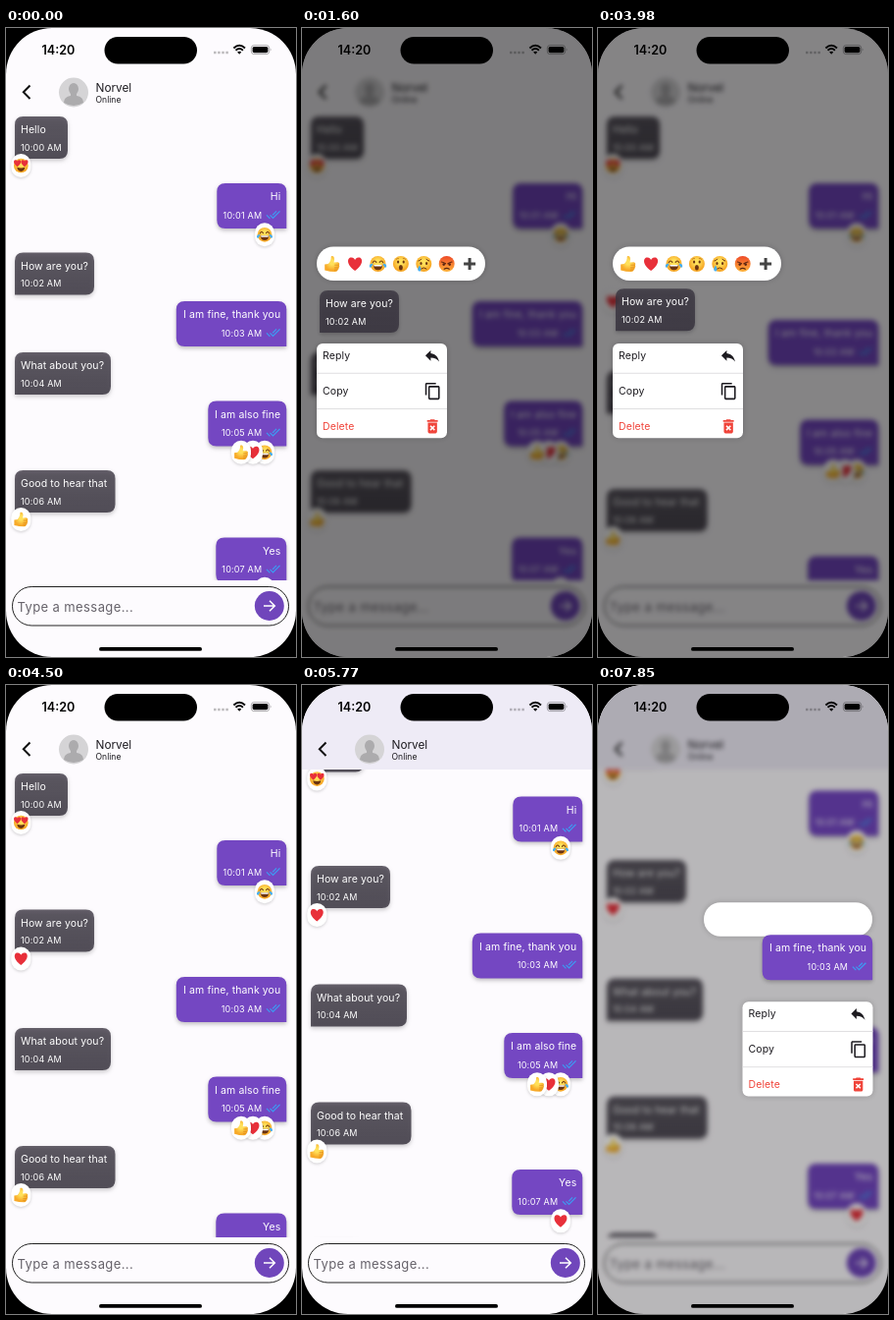
Animation, 296 px wide and 640 px high, one loop 8000 ms. Source, as an HTML page:

```html
<!DOCTYPE html>
<html lang="en">
<head>
<meta charset="utf-8">
<title>Chat reactions</title>
<style>
  html, body { margin: 0; width: 100%; height: 100%; overflow: hidden; background: #000; }
  svg { display: block; width: 296px; height: 640px; border-radius: 47px; font-family: Inter, sans-serif; }
  .body { font-size: 10.5px; letter-spacing: .1px; }
  .time { font-size: 9px; letter-spacing: .2px; }
  .end { text-anchor: end; }
  .bubble { fill: #fff; filter: drop-shadow(0 2px 2px rgba(0, 0, 0, .25)); }
  .pill { filter: drop-shadow(0 1px 1.5px rgba(0, 0, 0, .18)); }
  .card { filter: drop-shadow(0 0 3px rgba(0, 0, 0, .2)); }
</style>
</head>
<body>
<svg viewBox="0 0 296 640">
  <defs>
    <radialGradient id="yellow" cy=".4"><stop offset=".3" stop-color="#ffe05a"/><stop offset="1" stop-color="#f7a928"/></radialGradient>
    <linearGradient id="rage" x2="0" y2="1"><stop stop-color="#ee4a28"/><stop offset="1" stop-color="#ffb33a"/></linearGradient>
    <linearGradient id="slate" x2="0" y2="1"><stop stop-color="#35303c" stop-opacity=".76"/><stop offset="1" stop-color="#35303c" stop-opacity=".82"/></linearGradient>
    <clipPath id="viewport"><rect y="86" width="296" height="476"/></clipPath>

    <path id="heart" fill="#e8303a" d="M0 7C-10 0-7.5-7-3.7-6.5-1.5-6.4 0-4.5 0-4 0-4.5 1.5-6.4 3.7-6.5 7.5-7 10 0 0 7Z"/>
    <circle id="face" r="8" fill="url(#yellow)"/>
    <g id="love">
      <use href="#face"/>
      <use href="#heart" transform="translate(-4 -2.6) scale(.55)"/><use href="#heart" transform="translate(4 -2.6) scale(.55)"/>
      <path fill="#6b3410" d="M-4.3 2Q0 3.4 4.3 2 3.8 6.4 0 6.4-3.8 6.4-4.3 2Z"/>
    </g>
    <g id="joy">
      <use href="#face"/>
      <path fill="none" stroke="#6b3410" stroke-width="1.1" stroke-linecap="round" d="M-5.2-1.4Q-3.5-4.4-1.6-1.6M5.2-1.4Q3.5-4.4 1.6-1.6"/>
      <path fill="#6b3410" d="M-4.8 1H4.8Q4.3 6.3 0 6.3-4.3 6.3-4.8 1Z"/><path fill="#fff" d="M-4.3 1H4.3L3.9 2.6H-3.9Z"/>
      <path fill="#45aef0" d="M-5-.4Q-9.5 0-8.6 3.2-6.5 5-5-.4ZM5-.4Q9.5 0 8.6 3.2 6.5 5 5-.4Z"/>
    </g>
    <g id="wow">
      <use href="#face"/>
      <g fill="#6b3410"><ellipse cx="-2.8" cy="-2" rx="1.1" ry="1.6"/><ellipse cx="2.8" cy="-2" rx="1.1" ry="1.6"/><ellipse cy="3.7" rx="2" ry="2.7"/></g>
      <path fill="none" stroke="#b5701c" stroke-width=".8" d="M-5-4.5Q-3.5-6-2-5.4M5-4.5Q3.5-6 2-5.4"/>
    </g>
    <g id="sad">
      <use href="#face"/>
      <g fill="#6b3410"><ellipse cx="-2.8" cy="-.5" rx="1.1" ry="1.5"/><ellipse cx="2.8" cy="-.5" rx="1.1" ry="1.5"/></g>
      <path fill="none" stroke="#6b3410" stroke-width="1" stroke-linecap="round" d="M-2.7 5Q0 2.6 2.7 5M-5.4-3Q-3.5-3.4-2.6-4.8M5.4-3Q3.5-3.4 2.6-4.8"/>
      <path fill="#45aef0" d="M-4.2 1.4Q-7 5-5.6 7-3.6 8.4-2.8 6-2.8 4-4.2 1.4Z"/>
    </g>
    <g id="angry">
      <circle r="8" fill="url(#rage)"/>
      <g fill="#5a2410"><circle cx="-3" cy=".6" r="1.3"/><circle cx="3" cy=".6" r="1.3"/></g>
      <path fill="none" stroke="#5a2410" stroke-width="1.1" stroke-linecap="round" d="M-5.3-2Q-3-1.6-1.2-.2M5.3-2Q3-1.6 1.2-.2M-2.6 5.3Q0 3.4 2.6 5.3"/>
    </g>
    <g id="thumb">
      <path fill="url(#yellow)" d="M-7.5.5-4 0C-2-2-.8-4.5-1-7.6 1.8-9 3.2-5.6 1.8-1.6L5.8-1.8Q8.3-1 7.2 1.2 8.2 2.6 6.8 4 7.2 5.6 5.7 6.2 5.5 8 3.3 8L-2.2 7.7-7.5 6.6Z"/>
      <path fill="none" stroke="#d98a1d" stroke-width=".7" d="M2.5 1.2H7M2.3 3.9H6.8M2.3 6.2H5.7"/>
    </g>
    <path id="plus" d="M0-6V6M-6 0H6" stroke="#444" stroke-width="3"/>
    <path id="ticks" fill="#3d9bf2" d="M18 7l-1.4-1.4-6.4 6.3 1.5 1.4zm4.2-1.4L11.7 16.2 7.5 12l-1.4 1.4 5.6 5.6 12-12zM.4 13.4 6 19l1.4-1.4L1.8 12z"/>
  </defs>

  <rect width="296" height="640" fill="#fdfbfe"/>
  <g id="app">
    <g clip-path="url(#viewport)"><g id="list"></g></g>
    <rect id="tint" x="-20" y="-20" width="336" height="106" fill="#eeebf6"/>
    <path d="M24.5 58.5 17.8 65.2 24.5 72" fill="none" stroke="#111" stroke-width="2"/>
    <circle cx="69" cy="65.5" r="15" fill="#d5d4d6"/>
    <g fill="#acabad"><ellipse cx="69" cy="62" rx="5" ry="6"/><path d="M59 76Q59 70 66 69V66H72V69Q79 70 79 76 69 82 59 76Z"/></g>
    <text x="91.5" y="64.5" font-size="11.8" fill="#1d1b20">Norvel</text>
    <text x="91.5" y="76.3" font-size="8.6" fill="#1d1b20">Online</text>
    <rect x="6.5" y="568.5" width="282" height="39.5" rx="19.7" fill="#fdfbfe" stroke="#222"/>
    <text x="11.5" y="593.7" font-size="13" letter-spacing=".4" fill="#66626a">Type a message...</text>
    <circle cx="268.8" cy="588" r="15" fill="#7046bb"/>
    <path d="M263 588H274M269 582.7 274.3 588 269 593.3" fill="none" stroke="#fff" stroke-width="1.5"/>
  </g>
  <rect id="scrim" width="296" height="640"/>
  <g id="popup">
    <g id="bar">
      <rect class="card" x="15" y="222.5" width="172" height="34.5" rx="17" fill="#fff"/>
    </g>
    <g id="menu" class="body" fill="#1d1b20">
      <rect class="card" x="15" y="321" width="133" height="96.3" rx="6" fill="#fff"/>
      <path d="M15 351.3H148M15 387.5H148" stroke="#d9d7da" stroke-width=".8"/>
      <text x="21" y="337">Reply</text><text x="21" y="373">Copy</text><text x="21" y="409" fill="#f0443a">Delete</text>
      <path transform="translate(123.6 324) scale(.78)" d="M10 9V5l-7 7 7 7v-4.1c5 0 8.5 1.6 11 5.1-1-5-4-10-11-11z"/>
      <path transform="translate(124.2 360.2) scale(.78)" d="M16 1H4c-1.1 0-2 .9-2 2v14h2V3h12V1zm3 4H8c-1.1 0-2 .9-2 2v14c0 1.1.9 2 2 2h11c1.1 0 2-.9 2-2V7c0-1.1-.9-2-2-2zm0 16H8V7h11v14z"/>
      <path transform="translate(123.8 396) scale(.78)" fill="#f0443a" d="M6 19c0 1.1.9 2 2 2h8c1.1 0 2-.9 2-2V7H6v12zm2.5-7.1l1.4-1.4 2.1 2.1 2.1-2.1 1.4 1.4-2.1 2.1 2.1 2.1-1.4 1.4-2.1-2.1-2.1 2.1-1.4-1.4 2.1-2.1zM15.5 4l-1-1h-5l-1 1H5v2h14V4z"/>
    </g>
    <g id="hero"></g>
  </g>

  <g id="status">
    <text x="36.5" y="26.6" font-size="12.6" font-weight="600">14:20</text>
    <rect x="100.5" y="9" width="94.5" height="27.5" rx="13.7"/>
    <path d="M212 25H227" stroke="#000" stroke-opacity=".25" stroke-width="2.4" stroke-dasharray="2.6 1.5"/>
    <g fill="none" stroke="#000" stroke-width="1.9"><path d="M232.4 20.5Q238.2 15.2 244 20.5M234.5 22.8Q238.2 19.4 241.9 22.8"/></g>
    <path d="M238.2 26.8 236.1 24.5Q238.2 22.8 240.3 24.5Z"/>
    <rect x="250.3" y="17.6" width="18.4" height="9" rx="2.8" fill="none" stroke="#000" stroke-opacity=".4" stroke-width=".8"/>
    <rect x="251.6" y="18.9" width="15.8" height="6.4" rx="1.7"/>
    <path d="M269.8 20.6Q271.4 22.1 269.8 23.6Z" opacity=".4"/>
    <rect x="95" y="630" width="105" height="3.8" rx="1.9"/>
  </g>
</svg>
<script>
const LOOP = 8000, RIGHT = 286.3, HEART_SHIFT = 19;
const FLIGHT = 300, TAP = 3380, POP = 3900;
const $ = id => document.getElementById(id);
const clamp = v => Math.min(1, Math.max(0, v));

const message = (text, time, y, w, mine, reactions = []) =>
  ({ text, time, y, w, mine, reactions, h: mine ? 46 : 43, x: mine ? RIGHT - w : 9 });
const messages = [
  message('Hello', '10:00 AM', 90, 54, false, ['love']),
  message('Hi', '10:01 AM', 158, 71, true, ['joy']),
  message('How are you?', '10:02 AM', 228.5, 81, false, ['heart']),
  message('I am fine, thank you', '10:03 AM', 278, 112.5, true),
  message('What about you?', '10:04 AM', 330, 98, false),
  message('I am also fine', '10:05 AM', 379.5, 80, true, ['thumb', 'heart', 'joy']),
  message('Good to hear that', '10:06 AM', 450, 102.5, false, ['thumb']),
  message('Yes', '10:07 AM', 518.5, 72, true, ['heart']),
  message('Great', '10:08 AM', 589, 52, false),
];
const ANSWERED = 2;
const sessions = [
  { index: ANSWERED, shown: 500, fly: 500, close: POP },
  { index: 3, shown: 7720, fly: 7757, close: Infinity },
];

function bubble({ text, time, w, h, mine }) {
  const r = 8.5, bl = mine ? r : 0, br = mine ? 0 : r;
  const shape = `M${r} 0H${w - r}Q${w} 0 ${w} ${r}V${h - br}Q${w} ${h} ${w - br} ${h}H${bl}Q0 ${h} 0 ${h - bl}V${r}Q0 0 ${r} 0Z`;
  const label = (cls, x, y, str) => `<text class="${cls}${mine ? ' end' : ''}" x="${x}" y="${y}">${str}</text>`;
  return `<g class="bubble"><path d="${shape}" fill="${mine ? '#7447c2' : 'url(#slate)'}"/></g><g fill="#fff">` +
    label('body', mine ? w - 6 : 6, 17, text) + label('time', mine ? w - 25 : 6, mine ? 35.7 : 34.5, time) + '</g>' +
    (mine ? `<use href="#ticks" transform="translate(${w - 21} 24.5) scale(.62)"/>` : '');
}

// The first reaction lies on top, so pills are emitted in reverse.
function pills({ reactions, w, h, mine }) {
  const last = reactions.length - 1;
  return reactions.map((name, i) => {
    const x = mine ? w - 22.3 - 12 * (last - i) : 6.3;
    return `<g transform="translate(${x} ${h + (mine ? 6.3 : 7)})"><rect class="pill" x="-10" y="-12" width="20" height="24" rx="10" fill="#fff"/><use href="#${name}" transform="scale(.92)"/></g>`;
  }).reverse().join('');
}

$('list').innerHTML = messages.map(m => `<g><g>${bubble(m)}</g><g>${pills(m)}</g></g>`).join('');
const rows = [...$('list').children];
const choices = ['thumb', 'heart', 'joy', 'wow', 'sad', 'angry', 'plus'];
$('bar').insertAdjacentHTML('beforeend', choices.map(name => `<use href="#${name}"/>`).join(''));
const icons = [...$('bar').querySelectorAll('use')];
const place = (el, x, y, scale = 1) => el.setAttribute('transform', `translate(${x} ${y}) scale(${scale})`);

// cubic-bezier(.4, 0, .2, 1)
function fastOutSlowIn(x) {
  let lo = 0, hi = 1;
  for (let i = 0; i < 20; i++) {
    const u = (lo + hi) / 2, v = 1 - u;
    if (1.2 * v * v * u + .6 * v * u * u + u ** 3 < x) lo = u; else hi = u;
  }
  return 3 * (1 - lo) * lo * lo + lo ** 3;
}

function drawPopup(t, session, scroll) {
  const m = messages[session.index];
  const raw = Math.min(clamp((t - session.fly) / FLIGHT), 1 - clamp((t - session.close) / FLIGHT));
  $('scrim').setAttribute('opacity', .51 * (1 - (1 - raw) ** 2));

  const spread = m.mine ? 1.2 : 0;
  place($('bar'), m.mine ? 93 : 0, -spread);
  place($('menu'), m.mine ? 132.5 : 0, spread);

  // The bubble flies on an arc: sideways first, then down.
  const travel = fastOutSlowIn(raw), side = 1 - (1 - travel) ** 2.2;
  const fromY = m.y - scroll + (session.index > ANSWERED ? HEART_SHIFT : 0);
  if (hero.shownIndex !== session.index) {
    hero.shownIndex = session.index;
    hero.innerHTML = bubble(m);
  }
  place(hero, m.x + (m.mine ? -9 : 9) * side, fromY + (267 - spread - fromY) * travel);

  icons.forEach((icon, i) => {
    const enter = clamp((t - session.shown - 200) / 500);
    const slide = 20 * i * (1 - enter) ** 2;
    const pulse = choices[i] === 'heart' ? Math.sin(Math.PI * clamp((t - TAP) / 500)) * .5 : 0;
    icon.setAttribute('opacity', clamp(enter / .65));
    place(icon, 30.7 + 23.4 * i - slide, 240, 1 + pulse);
  });
}

const hero = $('hero');
function render(t) {
  const scroll = 50.5 * (1 - (1 - clamp((t - 5300) / 760)) ** 2.2);
  const session = sessions.find(s => t >= s.shown && t < s.close + FLIGHT);
  const answered = t >= POP;

  rows.forEach((row, i) => {
    const m = messages[i];
    place(row, m.x, m.y - scroll + (answered && i > ANSWERED ? HEART_SHIFT : 0));
    row.children[0].style.display = session && session.index === i ? 'none' : '';
  });
  rows[ANSWERED].children[1].style.display = answered ? '' : 'none';
  $('tint').setAttribute('opacity', clamp((t - 5310) / 180));

  $('app').style.filter = session ? 'blur(2.5px)' : 'none';
  $('popup').style.display = $('scrim').style.display = session ? '' : 'none';
  if (session) drawPopup(t, session, scroll);
}

function tick() {
  render(performance.now() % LOOP);
  requestAnimationFrame(tick);
}
tick();
</script>
</body>
</html>
```
